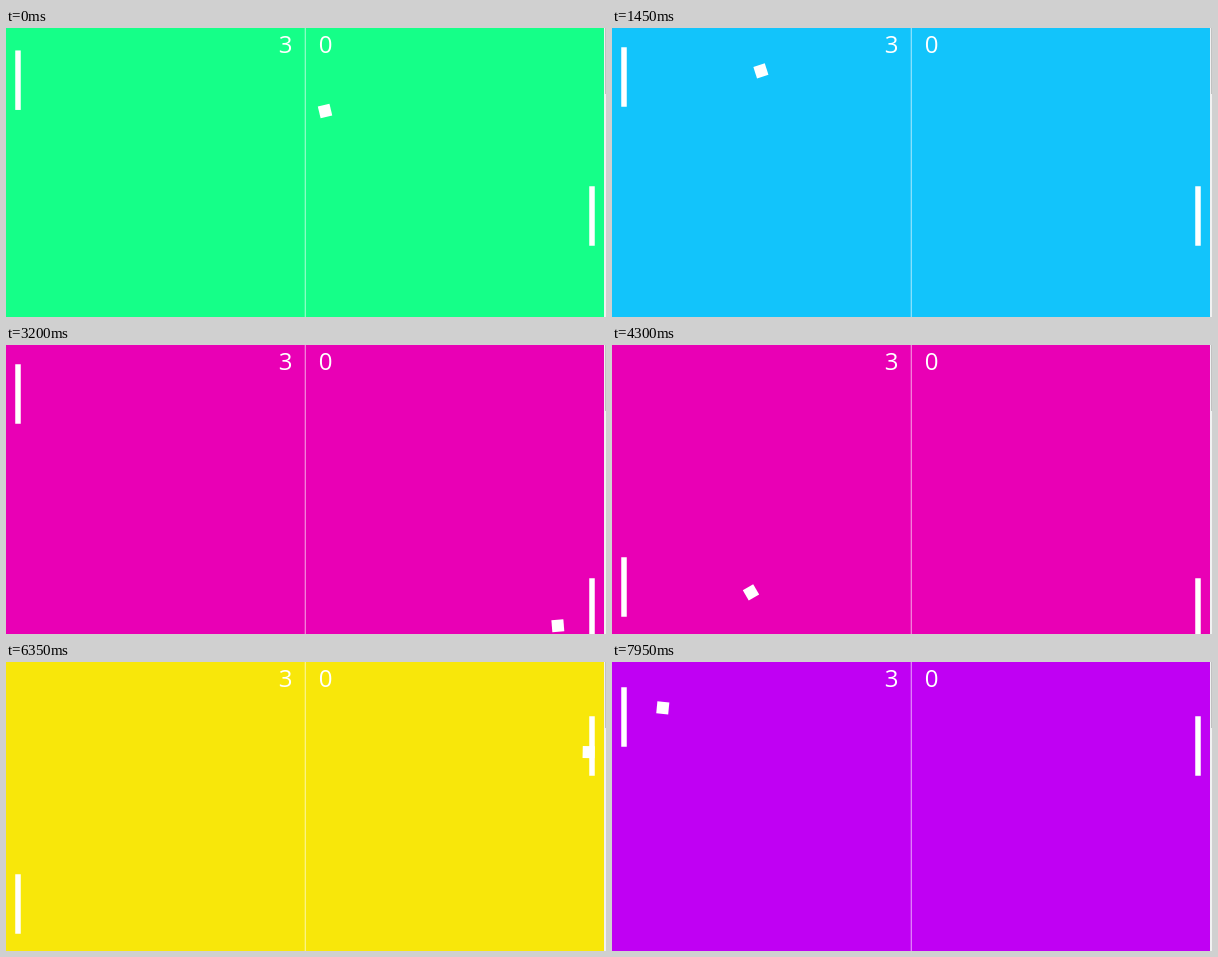
Animation, 600 px wide and 289 px high, one loop 8 s. Source, as an HTML page with a canvas:

```html
<!DOCTYPE html>
<html lang="en">
<head>
<meta charset="utf-8">
<title>Paddle game</title>
<style>
  html, body { margin: 0; width: 100%; height: 100%; overflow: hidden; }
  canvas { display: block; }
</style>
</head>
<body>
<canvas id="stage" width="600" height="289"></canvas>
<script>
const ctx = document.getElementById('stage').getContext('2d');
const LOOP = 8000;
const LEFT = 20, RIGHT = 583, TOP = 7, BOTTOM = 282;   // limits of the ball centre
const BALL_SIZE = 12;
const PADDLE_SPEED = 0.37;                             // px per ms
const SPIN = 0.059;                                    // degrees per ms

// Paddle hits, alternating right and left. "y" is the ball, "top" the paddle,
// "wall" a bounce on the way here, "delay" the receiver's reaction time.
const hits = [
  { time: -843, y: 120, top: 158, color: '#15ff88' },
  { time: 955, y: 41, top: 19, delay: 430, color: '#12c4fb' },
  { time: 3117, y: 278, top: 233, delay: 1490, wall: TOP, color: '#e900b5' },
  { time: 4617, y: 237, top: 212, delay: 430, wall: BOTTOM, color: '#f8e70a' },
  { time: 6351, y: 90, top: 54, delay: 500, color: '#eb0098' },
  { time: 7869, y: 48, top: 25, delay: 430, color: '#c000f3' },
  { time: 9350, y: 10, top: 54, delay: 430 }
];
const LEFT_START = 175;

const lerp = (a, b, t) => a + (b - a) * t;

function reflect(y) {
  if (y < TOP) return 2 * TOP - y;
  if (y > BOTTOM) return 2 * BOTTOM - y;
  return y;
}

function approach(from, to, distance) {
  const step = Math.min(Math.max(distance, 0), Math.abs(to - from));
  return from + Math.sign(to - from) * step;
}

function rect(color, x, y, width, height) {
  ctx.fillStyle = color;
  ctx.fillRect(x, y, width, height);
}

function drawPaddle(x, top) {
  rect('#fff', x + 0.25, top + 0.25, 5.5, 59.5);
}

function drawBall(x, y, degrees) {
  ctx.save();
  ctx.translate(x, y);
  ctx.rotate(degrees * Math.PI / 180);
  rect('#fff', -BALL_SIZE / 2, -BALL_SIZE / 2, BALL_SIZE, BALL_SIZE);
  ctx.restore();
}

function drawScores() {
  ctx.fillStyle = '#fff';
  ctx.font = 'condensed 24px "Liberation Sans Narrow", "Open Sans", sans-serif';
  ctx.textAlign = 'center';
  ctx.fillText('3', 279.5, 25);
  ctx.fillText('0', 319.5, 25);
}

function draw(time) {
  const index = hits.findIndex(hit => hit.time > time);
  const from = hits[index - 1], to = hits[index];
  const progress = (time - from.time) / (to.time - from.time);
  const toLeft = index % 2 === 1;

  const x = toLeft ? lerp(RIGHT, LEFT, progress) : lerp(LEFT, RIGHT, progress);
  const endY = to.wall ? 2 * to.wall - to.y : to.y;
  const y = reflect(lerp(from.y, endY, progress));

  const receiverStart = index > 1 ? hits[index - 2].top : LEFT_START;
  const receiver = approach(receiverStart, to.top, (time - from.time - to.delay) * PADDLE_SPEED);

  rect(from.color, 0, 0, 600, 289);
  rect('rgba(255,255,255,.65)', 298.75, 0, 1, 289);
  drawScores();
  drawPaddle(9, toLeft ? receiver : from.top);
  drawPaddle(583, toLeft ? from.top : receiver);
  drawBall(x, y, SPIN * time - 13.5);
  rect('#f1f1f1', 598, 0, 2, 289);
  rect('#c1c1c1', 599, 0, 1, 66);
}

let start;
function tick(now) {
  start ??= now;
  draw((now - start) % LOOP);
  requestAnimationFrame(tick);
}
draw(0);
requestAnimationFrame(tick);
</script>
</body>
</html>
```
